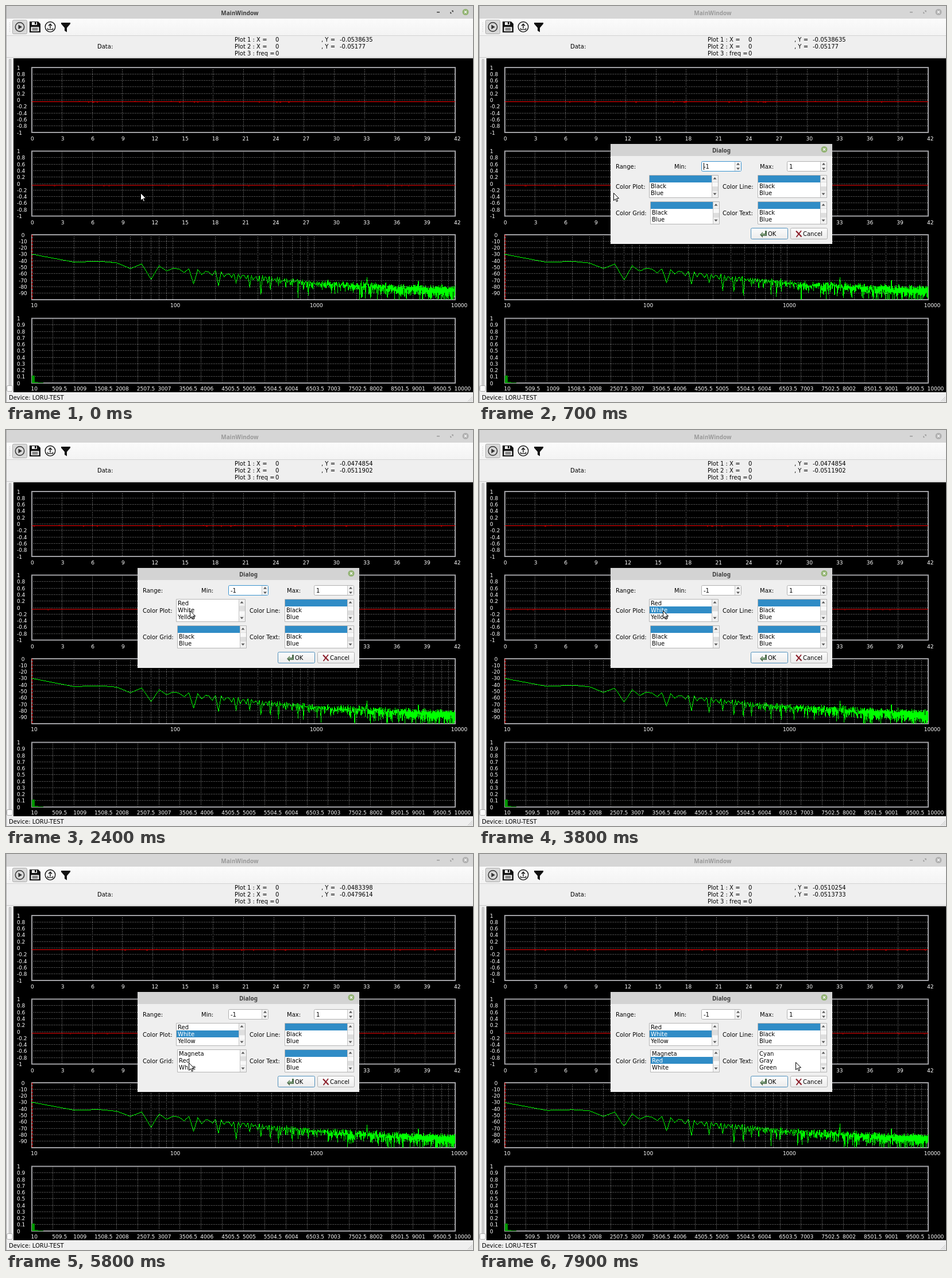
These frames come from a looping animation (813 px wide and 689 px high, 8000 ms). An HTML page with a canvas:

```html
<!DOCTYPE html>
<html lang="en">
<head>
<meta charset="utf-8">
<title>MainWindow</title>
<style>
html, body { margin: 0; width: 100%; height: 100%; overflow: hidden; background: #000; }
canvas { display: block; }
</style>
</head>
<body>
<canvas id="stage" width="813" height="689"></canvas>
<script>
const ctx = document.getElementById('stage').getContext('2d');
const LOOP = 8000, TICK = 100;
const LEFT = 45, RIGHT = 782, PLOT_W = RIGHT - LEFT;
const UI = '10px "DejaVu Sans", sans-serif';
const AXIS = '9px "DejaVu Sans", sans-serif';
const TITLE = 'bold 10px "Noto Sans", sans-serif';
const BLUE = '#308cc6';
const COLORS = ['', 'Black', 'Blue', 'Cyan', 'Gray', 'Green', 'Magneta', 'Red', 'White', 'Yellow'];

// Ticks on which the plots pause
const HOLDS = new Set([4, 8, 25, 26, 27, 28, 29, 30, 32, 34, 37, 42, 46, 69, 78]);
const READINGS = [
  ['-0.0538635', '-0.05177'],
  ['-0.0474854', '-0.0511902'],
  ['-0.0483398', '-0.0479614'],
  ['-0.0510254', '-0.0513733']
];
const POINTER = [
  [0, 234, 325], [900, 234, 325], [1700, 320, 314], [3800, 320, 314], [4500, 324, 363],
  [5000, 324, 363], [5700, 318, 363], [6500, 318, 363], [7000, 557, 363], [7900, 551, 362]
];

function random(a, b) {
  let h = Math.imul(a + 1, 374761393) ^ Math.imul(b + 7, 668265263);
  h = Math.imul(h ^ (h >>> 13), 1274126177);
  h = Math.imul(h ^ (h >>> 16), 2246822519);
  return ((h ^ (h >>> 15)) >>> 0) / 4294967296;
}

function rect(x, y, w, h, color) {
  ctx.fillStyle = color;
  ctx.fillRect(x, y, w, h);
}

function box(x, y, w, h, fill, border, radius = 0) {
  ctx.beginPath();
  ctx.roundRect(x + .5, y + .5, w - 1, h - 1, radius);
  ctx.fillStyle = fill;
  ctx.fill();
  ctx.strokeStyle = border;
  ctx.lineWidth = 1;
  ctx.stroke();
}

function text(str, x, y, color = '#000', font = UI, align = 'left') {
  ctx.font = font;
  ctx.textAlign = align;
  ctx.fillStyle = color;
  ctx.fillText(str, x, y);
}

function path(points, color, width = 1, fill = false) {
  ctx.beginPath();
  for (let i = 0; i < points.length; i += 2) ctx.lineTo(points[i], points[i + 1]);
  if (fill) {
    ctx.closePath();
    ctx.fillStyle = color;
    ctx.fill();
  } else {
    ctx.strokeStyle = color;
    ctx.lineWidth = width;
    ctx.stroke();
  }
}

function ring(x, y, r, color, width) {
  ctx.beginPath();
  ctx.arc(x, y, r, 0, Math.PI * 2);
  ctx.strokeStyle = color;
  ctx.lineWidth = width;
  ctx.stroke();
}

function disc(x, y, r, color) {
  ctx.beginPath();
  ctx.arc(x, y, r, 0, Math.PI * 2);
  ctx.fillStyle = color;
  ctx.fill();
}

function cross(x, y, r, color, width) {
  path([x - r, y - r, x + r, y + r], color, width);
  path([x + r, y - r, x - r, y + r], color, width);
}

function gradient(y0, y1, from, to) {
  const g = ctx.createLinearGradient(0, y0, 0, y1);
  g.addColorStop(0, from);
  g.addColorStop(1, to);
  return g;
}

// Window chrome

function drawTitleBar(active) {
  const ink = active ? '#3c3c3c' : '#9a9a9a';
  rect(0, 0, 813, 22, active ? '#d3d3d3' : '#d6d6d6');
  text('MainWindow', 407, 15.5, ink, TITLE, 'center');
  rect(750, 10, 5, 1.5, ink);
  path([774, 12.5, 774, 10.5], ink, 1.5);
  path([773.5, 12.5, 775.5, 12.5], ink, 1.5);
  path([776, 8.5, 778, 8.5, 778, 10.5], ink, 1.5);
  disc(800, 10.5, 5.5, active ? '#92b372' : '#b0b0b0');
  cross(800, 10.5, 2, '#f4f4f4', 1.4);
}

function drawToolBar() {
  rect(0, 22, 813, 30, gradient(22, 52, '#fbfbfb', '#f3f3f3'));
  for (let y = 29; y < 46; y += 3) rect(6, y, 1, 1, '#bbb');
  const ink = '#111';
  box(11, 24, 26, 25, '#d8d8d8', '#adadad', 2);
  ring(24, 36.5, 7.7, '#333', 1.5);
  path([21.5, 32.5, 28, 36.5, 21.5, 40.5], '#333', 1, true);

  path([41, 27, 56, 27, 60, 31, 60, 46, 41, 46], ink, 1, true);
  rect(45, 28, 9, 5, '#f8f8f8');
  rect(50, 28, 2.5, 4, ink);
  rect(43.5, 36.5, 14, 7.5, '#f8f8f8');
  rect(45.5, 38.5, 10, 1.2, ink);
  rect(45.5, 41, 10, 1.2, ink);

  ring(77, 36.3, 8.8, ink, 1.4);
  path([77, 39, 77, 31.5], ink, 1.4);
  path([74, 34.5, 77, 31.3, 80, 34.5], ink, 1.4);
  path([72.5, 38.5, 72.5, 40.8, 81.5, 40.8, 81.5, 38.5], ink, 1.3);

  path([96, 29, 112, 29, 112, 31, 106, 38, 106, 45.5, 102, 43, 102, 38, 96, 31], ink, 1, true);
}

function drawReadout(values) {
  rect(0, 52, 813, 39, '#efefef');
  rect(0, 51, 813, 1, '#d2d2d2');
  rect(0, 89, 813, 1, '#c8c8c8');
  text('Data:', 159, 74);
  for (let i = 0; i < 2; i++) {
    const y = 62 + i * 12;
    text(`Plot ${i + 1} : X =`, 398, y);
    text('0', 469, y);
    text(', Y =', 549, y);
    text(values[i], 581, y);
  }
  text('Plot 3 : freq =', 398, 86);
  text('0', 469, 86);
}

function drawSides() {
  rect(0, 90, 13, 582, '#efefef');
  box(5, 92, 4, 572, '#d6d6d6', '#b4b4b4', 2);
  box(1, 660, 11, 11, '#fafafa', '#a8a8a8', 2);
  rect(0, 672, 813, 17, '#efefef');
  text('Device: LORU-TEST', 5, 685);
  for (let i = 0; i < 3; i++) path([804 + i * 3, 688, 812, 680 + i * 3], '#c4c4c4');
  rect(0, 0, 1, 689, '#a6a6a6');
}

// Plots

function drawGrid(top, bottom, xs, rows) {
  ctx.save();
  ctx.setLineDash([1, 2]);
  for (const x of xs) {
    const px = Math.floor(x) + .5;
    path([px, top, px, bottom], '#a0a0a0');
  }
  for (let i = 1; i < rows; i++) {
    const py = Math.floor(top + (bottom - top) * i / rows) + .5;
    path([LEFT, py, RIGHT, py], '#a0a0a0');
  }
  ctx.restore();
  ctx.strokeStyle = '#a0a0a4';
  ctx.lineWidth = 2;
  ctx.strokeRect(LEFT, top, PLOT_W, bottom - top);
}

function drawRowLabels(top, bottom, rows, label, x, align) {
  for (let i = 0; i <= rows; i++) {
    const str = label(i);
    if (str !== '') text(str, x, top + (bottom - top) * i / rows + 3.5, '#fff', AXIS, align);
  }
}

function drawSignal(top, step, channel) {
  const bottom = top + 113, xs = [];
  for (let i = 0; i <= 14; i++) {
    const x = LEFT + PLOT_W * i / 14;
    if (i % 14) xs.push(x);
    text(i * 3, x - 2, bottom + 14, '#fff', AXIS);
  }
  drawGrid(top, bottom, xs, 10);
  drawRowLabels(top, bottom, 10, i => String((5 - i) / 5), 19, 'left');
  const y = top + 59;
  rect(LEFT, y, PLOT_W, 1, '#f00');
  for (let i = 0; i < 18; i++) {
    const x = LEFT + Math.floor(random(i, step * 2 + channel) * (PLOT_W - 3));
    rect(x, y + (i % 3 ? 1 : -1), 1 + i % 3, 1, '#b00000');
  }
}

const binX = i => LEFT + PLOT_W / 3 * Math.log10(i);

// A decaying lobed response with noise growing toward high frequencies
function binY(i, step) {
  const start = [432, 446, 444.5, 447, 457];
  if (i <= start.length) return start[i - 1] + random(i, step) - .5;
  const x = binX(i);
  const u = (x - 370) / 412;
  const level = u < 0 ? 462 + (x - 370) * .1 : 462 + 31 * (1 - Math.pow(1 - u, 1.5));
  const lobe = Math.max(Math.abs(Math.sin(Math.PI * i * 3 / 7)), .09);
  const tone = 3 * Math.exp(-(((i - 237) / 1.5) ** 2)) + 3.2 * Math.exp(-(((i - 548) / 2.5) ** 2));
  const noise = Math.min(.55, i / 420) * Math.sqrt(-Math.log(1 - random(i, step * 2 + 100)));
  const angle = Math.PI * 2 * random(i, step * 2 + 501);
  const size = Math.hypot(lobe + tone + noise * Math.cos(angle), noise * Math.sin(angle));
  return Math.min(510, level - 22.6 * Math.log10(Math.max(size, .04)));
}

function pixelLine(x0, y0, x1, y1) {
  const n = Math.max(1, Math.ceil(Math.max(Math.abs(x1 - x0), Math.abs(y1 - y0))));
  for (let k = 0; k <= n; k++) {
    ctx.fillRect(Math.floor(x0 + (x1 - x0) * k / n), Math.floor(y0 + (y1 - y0) * k / n), 1, 1);
  }
}

function drawSpectrum(step) {
  const top = 398, bottom = 511, xs = [];
  for (let d = 0; d < 3; d++) {
    for (let m = d ? 1 : 2; m < 10; m++) xs.push(binX(m * 10 ** d));
  }
  drawGrid(top, bottom, xs, 10);
  drawRowLabels(top, bottom, 10, i => i === 10 ? '' : String(-10 * i), 29.5, 'center');
  for (let d = 0; d <= 3; d++) {
    text(10 ** (d + 1), binX(10 ** d) + 4 + (d === 3 ? 3 : 0), 524, '#fff', AXIS, 'center');
  }
  ctx.save();
  ctx.setLineDash([4, 2]);
  path([45.5, top, 45.5, bottom], '#f00');
  ctx.restore();
  ctx.fillStyle = '#0f0';
  let x = binX(1), y = binY(1, step);
  for (let i = 2; i <= 1000; i++) {
    const nx = Math.min(781, binX(i)), ny = binY(i, step);
    pixelLine(x, y, nx, ny);
    x = nx;
    y = ny;
  }
}

function drawBars() {
  const top = 543.5, bottom = 656, xs = [];
  for (let i = 0; i <= 20; i++) {
    const x = LEFT + PLOT_W * i / 20;
    if (i % 20) xs.push(x);
    text(10 + 499.5 * i, x - 1.5, 669, '#fff', AXIS);
  }
  drawGrid(top, bottom, xs, 10);
  drawRowLabels(top, bottom, 10, i => String((10 - i) / 10), 19, 'left');
  rect(45, 643, 5, 13, '#009400');
  rect(50, 654, 6, 2, '#008000');
  rect(56, 655, 9, 1, '#008000');
}

// Dialog

function arrow(x, y, dir) {
  path([x - 3, y + 1.5 * dir, x + 3, y + 1.5 * dir, x, y - 2 * dir], '#555', 1, true);
}

function drawSpin(x, w, value, focused, caret) {
  box(x, 270, w, 18, '#fff', focused ? '#3a93cf' : '#b0b0b0', 2);
  rect(x + w - 11, 271, 10, 16, '#f3f3f3');
  rect(x + w - 12, 271, 1, 16, '#c8c8c8');
  arrow(x + w - 6, 275, 1);
  arrow(x + w - 6, 283, -1);
  text(value, x + 4, 283);
  if (caret) rect(x + 4, 273, 1, 12, '#000');
}

function drawList(x, y, first, selected) {
  box(x, y, 121, 40, '#fff', '#b4b4b4');
  ctx.save();
  ctx.beginPath();
  ctx.rect(x + 1, y + 1, 108, 38);
  ctx.clip();
  for (let row = 0; row < 4; row++) {
    const index = first + row, top = y + 1 + row * 12;
    if (index === selected) rect(x + 1, top, 108, 12, BLUE);
    text(COLORS[index] || '', x + 3, top + 10, index === selected ? '#fff' : '#000');
  }
  ctx.restore();
  rect(x + 109, y + 1, 11, 38, '#f0f0f0');
  rect(x + 109, y + 1, 1, 38, '#c4c4c4');
  rect(x + 110, y + 12, 10, 16, '#dedede');
  rect(x + 110, y + 13 + first * 1.2, 10, 7, '#f8f8f8');
  arrow(x + 114.5, y + 6, 1);
  arrow(x + 114.5, y + 33, -1);
}

function drawButton(x, label, labelX, border) {
  box(x, 386, 65, 20, gradient(386, 406, '#fdfdfd', '#ebebeb'), border, 2);
  text(label, labelX, 400);
}

// Row reached by a series of wheel turns
const scrolled = (t, turns) => turns.reduce((row, [at, to]) => t >= at ? to : row, 0);

function drawDialog(t) {
  rect(229, 240, 386, 174, '#efefef');
  rect(229, 240, 386, 21, '#d3d3d3');
  text('Dialog', 422, 254.5, '#3c3c3c', TITLE, 'center');
  disc(601, 249.5, 5.5, '#92b372');
  cross(601, 249.5, 2, '#f4f4f4', 1.4);

  text('Range:', 238, 283);
  text('Min:', 340, 283);
  text('Max:', 489, 283);
  const focused = t < 3500;
  drawSpin(387, 70, '-1', focused, focused && (t - 600) % 1000 < 500);
  drawSpin(536, 70, '1', false, false);

  text('Color Plot:', 238, 318);
  text('Color Line:', 424, 318);
  text('Color Grid:', 238, 364);
  text('Color Text:', 424, 364);
  drawList(296, 294, scrolled(t, [[1800, 3], [2000, 6], [2200, 7]]), t < 3500 ? 0 : 8);
  drawList(485, 294, 0, 0);
  drawList(298, 340, scrolled(t, [[4300, 3], [4500, 6]]), t < 6200 ? 0 : 7);
  drawList(485, 340, scrolled(t, [[7700, 3]]), 0);

  drawButton(473, 'OK', 503, '#4f8fbb');
  path([489, 398, 494, 393, 494, 396, 498, 396, 498, 391, 501, 391, 501, 400, 494, 400, 494, 403],
    '#4c6b4c', 1, true);
  path([491, 398, 493.5, 395.5, 493.5, 398, 499.5, 398], '#8fb08a', 1.3);
  drawButton(542, 'Cancel', 564, '#b2b2b2');
  path([552, 391.5, 561.5, 401.5], '#8c1f2a', 2.2);
  path([561, 391, 552.5, 402], '#8c1f2a', 1.8);
}

function drawPointer(t) {
  const next = POINTER.findIndex(p => p[0] > t);
  const b = POINTER[next < 0 ? POINTER.length - 1 : next];
  const a = next < 0 ? b : POINTER[next - 1];
  const u = a === b ? 0 : (t - a[0]) / (b[0] - a[0]);
  const k = u * u * (3 - 2 * u);
  ctx.save();
  ctx.translate(Math.round(a[1] + (b[1] - a[1]) * k), Math.round(a[2] + (b[2] - a[2]) * k));
  ctx.beginPath();
  [[0, 0], [0, 13], [3, 10.2], [5, 14.8], [7, 13.9], [5, 9.4], [9, 9.2]]
    .forEach(([x, y]) => ctx.lineTo(x + .5, y + .5));
  ctx.closePath();
  ctx.fillStyle = '#fff';
  ctx.fill();
  ctx.strokeStyle = '#000';
  ctx.lineWidth = 1;
  ctx.stroke();
  ctx.restore();
}

function draw(tick) {
  const t = tick * TICK;
  const open = t >= 600;
  let step = tick;
  while (HOLDS.has(step)) step--;
  rect(0, 0, 813, 689, '#000');
  drawTitleBar(!open);
  drawToolBar();
  drawReadout(READINGS[Math.floor(t / 2000)]);
  drawSides();
  drawSignal(107, step, 0);
  drawSignal(252.5, step, 1);
  drawSpectrum(step);
  drawBars();
  if (open) drawDialog(t);
  drawPointer(t);
}

const begin = performance.now();
let shown = -1;
function frame() {
  const tick = Math.floor((performance.now() - begin) % LOOP / TICK);
  if (tick !== shown) draw(shown = tick);
  requestAnimationFrame(frame);
}
frame();
</script>
</body>
</html>
```
